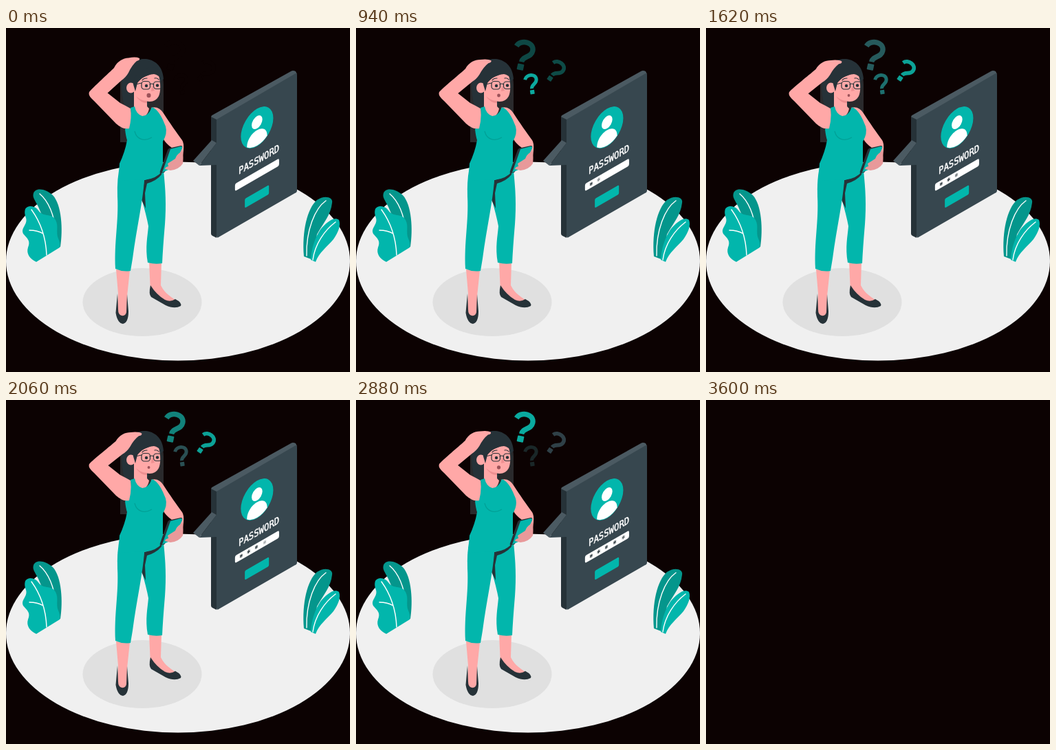
An HTML page that plays this animation: 500x500 px, repeating every 3.62 s.

```html
<!DOCTYPE html>
<html lang="en">
<head>
<meta charset="utf-8">
<title>Forgotten password</title>
<style>
  html, body { margin: 0; width: 100%; height: 100%; overflow: hidden; background: #0c0202; }
  svg { display: block; width: 100vw; height: 100vh; }
  .teal { fill: #02b6ac; }
  .deep { fill: #04968c; }
  .dark { fill: #263238; }
  .skin { fill: #ffa8a7; }
  .line { fill: none; stroke: #263238; stroke-width: 1.2; stroke-linecap: round; }
  .vein { fill: none; stroke: #fff; stroke-width: 1.4; stroke-linecap: round; }
  .label { font: 14.2px "DejaVu Sans Mono", monospace; fill: #fff; stroke: #fff; stroke-width: .5; }
</style>
</head>
<body>
<svg viewBox="0 0 500 500">
  <defs>
    <g id="ask">
      <path d="M-12 -9.500C-8 -21 12.500 -20.500 12.500 -7.500C12.500 3 0 2 0 11.500" fill="none" stroke="currentColor" stroke-width="7.500"/>
      <rect x="-4.700" y="14.500" width="9.400" height="9" rx="1" fill="currentColor"/>
    </g>
    <path id="star" d="M0 -2.700V2.700M-2.400 -1.400L2.400 1.400M-2.400 1.400L2.400 -1.400" stroke="#263238"/>
  </defs>
  <g id="scene">
    <ellipse cx="250" cy="339" rx="250" ry="144.500" fill="#f0f0f0"/>
    <ellipse cx="198" cy="398.500" rx="86.500" ry="49.500" fill="#e0e0e0"/>

    <g id="plants">
      <path class="deep" d="M40 240C44 231 58 234 68 243C81 257 83 293 79 318L64 326C60 290 52 270 46 258C42 250 38 246 40 240Z"/>
      <path class="vein" d="M49 241C62 252 70 272 73 298"/>
      <path class="teal" d="M28 263C32 257 42 258 47 265C54 276 66 268 72 279C77 288 72 297 76 306Q79 312 78 319L44 340C35 336 29 328 32 319C36 309 31 306 25 299C21 290 32 286 29 276Q26 269 28 263Z"/>
      <path class="vein" d="M37 264C50 282 58 304 59 330M34 294Q46 294 54 299"/>
      <path class="deep" d="M433 332C430 295 438 262 452 250C463 242 476 246 474 254C472 272 462 282 452 300L446 337Z"/>
      <path class="vein" d="M465 251C449 262 436 294 437 331"/>
      <path class="teal" d="M484 279C477 273 465 283 457 293C449 305 444 320 443 337L450 340C455 326 467 318 476 307C483 297 487 287 484 279Z"/>
      <path class="vein" d="M479 282C463 294 449 314 446 337"/>
    </g>

    <g id="panel">
      <path d="M298 130Q298 127 301 126L414 63Q417 61 421 63L423 67L306 134Z" fill="#4b5a62"/>
      <path class="dark" d="M298 129L306 133V305L300 302Q298 301 298 299Z"/>
      <path d="M306 133L421 66Q423 66 423 69V236Q423 239 420 240L309 304Q306 306 306 302Z" fill="#37474f"/>
      <path d="M272 193L299 163L306 167L281 200Z" fill="#4b5a62"/>
      <path d="M281 200L306 167V199Z" fill="#37474f"/>
      <g transform="matrix(.866 -.5 0 1 306 133)">
        <circle class="teal" cx="68" cy="45.500" r="27.200"/>
        <circle cx="68" cy="38" r="9" fill="#fff"/>
        <path d="M51 66C51 44 85 44 85 66A27 27 0 0 1 51 66Z" fill="#fff"/>
        <text class="label" x="37" y="98.500">PASSWORD</text>
        <rect x="31" y="109" width="74" height="10.800" rx="2.500" fill="#fff"/>
        <rect class="teal" x="47.500" y="139" width="40.500" height="13.500" rx="2"/>
        <g id="stars"></g>
      </g>
    </g>

    <g id="asks"></g>

    <g id="woman">
      <path d="M166 68L215 55Q229 62 229 82V140H182V166H166Z" fill="#2a2a2c"/>
      <path class="dark" d="M169 74C172 52 188 44 204 45C219 47 228 58 229 74L210 92L206 116H173C169 104 167 88 169 74Z"/>

      <path class="skin" d="M160 351L180 352L176 390V413Q174 419 168 419Q162 417 162 409L163 386Z"/>
      <path class="dark" d="M162 386L159.500 414Q162 429 170 430Q178 428 178 412L176 387L175 413Q174 419 168 418Q163 417 163 409Z"/>
      <path class="skin" d="M208 340H226L225 374C231 386 239 390 247 396Q232 402 219 394L210 384Z"/>
      <path class="dark" d="M210 374Q207 387 211 391L232 403Q245 409 254 404Q256 399 246 394Q239 399 231 395Q219 388 210 374Z"/>

      <path class="skin" d="M211 116Q222 113 229 124C238 138 248 152 256 163Q259 167 258 178L256 192L246 188V177C238 173 231 166 228 160L220 140Z"/>

      <path class="teal" d="M199 222L229 208C232 235 233 258 231 285Q228 320 227 342Q217 344 206 341C202 318 206 302 207 288Q204 272 197 248Z"/>
      <path class="dark" d="M227 205Q221 216 201 221L197 250L203 262L202 240L205 226Q219 222 226 213Z"/>
      <path class="teal" d="M166 198L228 198L227 208Q219 219 201 221C199 252 190 290 184 335L181 353Q170 355 159 350C157 310 164 282 162 245Q161 218 166 198Z"/>
      <path class="skin" d="M186 90V118C190 133 205 134 208 117L205 114V102Z"/>
      <path class="teal" d="M187 114L181 116Q183 136 173 147Q174 157 176 163Q173 180 165 197Q163 220 170 222L203 220Q223 216 228 204V165Q235 153 232 143C227 130 221 118 212 115Q207 128 198 128Q189 125 187 114Z"/>
      <path d="M187 150C190 163 202 165 212 159" fill="none" stroke="#02a096" stroke-width="1.200"/>

      <path class="dark" d="M235 177Q236 175 238 174.500L254 171Q257 171 256 174L230 210L225 211Q223 211 224 208Z"/>
      <path class="teal" d="M239 176L254 172Q257 172 256 175L243 203L227 210Z"/>
      <path d="M257 177Q258 190 257 197Q251 206 239 207L231 205Q231 202 236 201L235 197L246 190Q248 184 253 181Z" fill="#e8999a"/>

      <path class="skin" d="M187 88C188 77 197 72 206 69Q216 63 222 69C225 80 225 92 222 99C218 107 209 109 200 105L188 100Z"/>
      <path d="M189 99Q196 106 205 106V109Q195 109 189 99Z" fill="#ee8f91"/>
      <ellipse class="skin" cx="181.500" cy="87" rx="6.500" ry="7.500"/>
      <path class="dark" d="M185 82C184 69 198 57 216 57Q225 61 226 74Q221 68 215 67C204 68 196 73 191 80L188 92Z"/>
      <path class="line" d="M188 82L197 80M209 82Q212 80 214.500 82"/>
      <rect class="line" x="197" y="77.500" width="12.500" height="11.500" rx="4"/>
      <rect class="line" x="214.500" y="78" width="12" height="10.500" rx="4"/>
      <path class="line" d="M198 76Q200 73 205 73M216 73Q220 72 222 75"/>
      <circle class="dark" cx="204" cy="84" r="2.200"/>
      <circle class="dark" cx="220" cy="83.500" r="2.200"/>
      <path d="M212 83L216 91L211 92" fill="#ee8f91"/>
      <ellipse id="mouth" cx="207.500" cy="98" fill="#9c5259"/>

      <path class="skin" d="M121 93C119 98 124 102 128 106L160 139Q170 148 179 146Q183 130 181 117Q174 113 166 109L147 94Z"/>
      <path id="forearm" class="skin" d="M121 93C131 82 150 65 157 58C162 48 170 44 178 43.500Q189 41.500 194 44Q195 47 190 48Q183 54 178 65Q174 72 168 76L147 95L136 104Q122 102 121 93Z"/>
    </g>
  </g>
</svg>
<script>
const LOOP = 3620, END = 3600;
const $ = id => document.getElementById(id);

function addUse(parent, href, transform) {
  const el = document.createElementNS('http://www.w3.org/2000/svg', 'use');
  el.setAttribute('href', href);
  el.setAttribute('transform', transform);
  $(parent).append(el);
  return el;
}

const stars = [41.5, 54, 67, 81, 95.5].map(x => addUse('stars', '#star', `translate(${x} 114.3)`));

const times = [0, 580, 940, 1620, 2060, 2880, 3600];
const asks = [
  ['translate(243 38) rotate(12)', '0c0202 162526 0e4744 265a5c 12827b 0aaa9f 0aaa9f'],
  ['translate(290 61.500) rotate(34) scale(.75)', '0c0202 123936 0e4b47 0ca297 0ca297 2f4047 141011'],
  ['translate(254.500 80.500) rotate(-8) scale(.67)', '0c0202 0ca99e 0ca99e 1d6f6e 2a4f53 1a2728 0c0202']
].map(([place, colors]) => ({
  el: addUse('asks', '#ask', place),
  colors: colors.split(' ').map(c => [0, 2, 4].map(i => parseInt(c.slice(i, i + 2), 16)))
}));

const clamp = v => Math.max(0, Math.min(1, v));

function draw(t) {
  $('scene').style.visibility = t < END ? 'visible' : 'hidden';

  stars.forEach((el, i) => el.setAttribute('opacity', clamp(t / 600 - i)));

  let k = 0;
  while (k < times.length - 2 && t >= times[k + 1]) k++;
  const f = clamp((t - times[k]) / (times[k + 1] - times[k]));
  for (const { el, colors } of asks) {
    const rgb = colors[k].map((c, i) => Math.round(c + (colors[k + 1][i] - c) * f));
    el.style.color = `rgb(${rgb})`;
  }

  const swing = Math.sin(Math.PI * t / END);
  $('forearm').setAttribute('transform', `rotate(${3.8 * swing} 126 97)`);
  const open = 1 - 0.38 * swing * swing;
  $('mouth').setAttribute('rx', 3 * open);
  $('mouth').setAttribute('ry', 3.2 * open);
}

const start = performance.now();
function tick(now) {
  draw(Math.max(0, now - start) % LOOP);
  requestAnimationFrame(tick);
}
draw(0);
requestAnimationFrame(tick);
</script>
</body>
</html>
```
